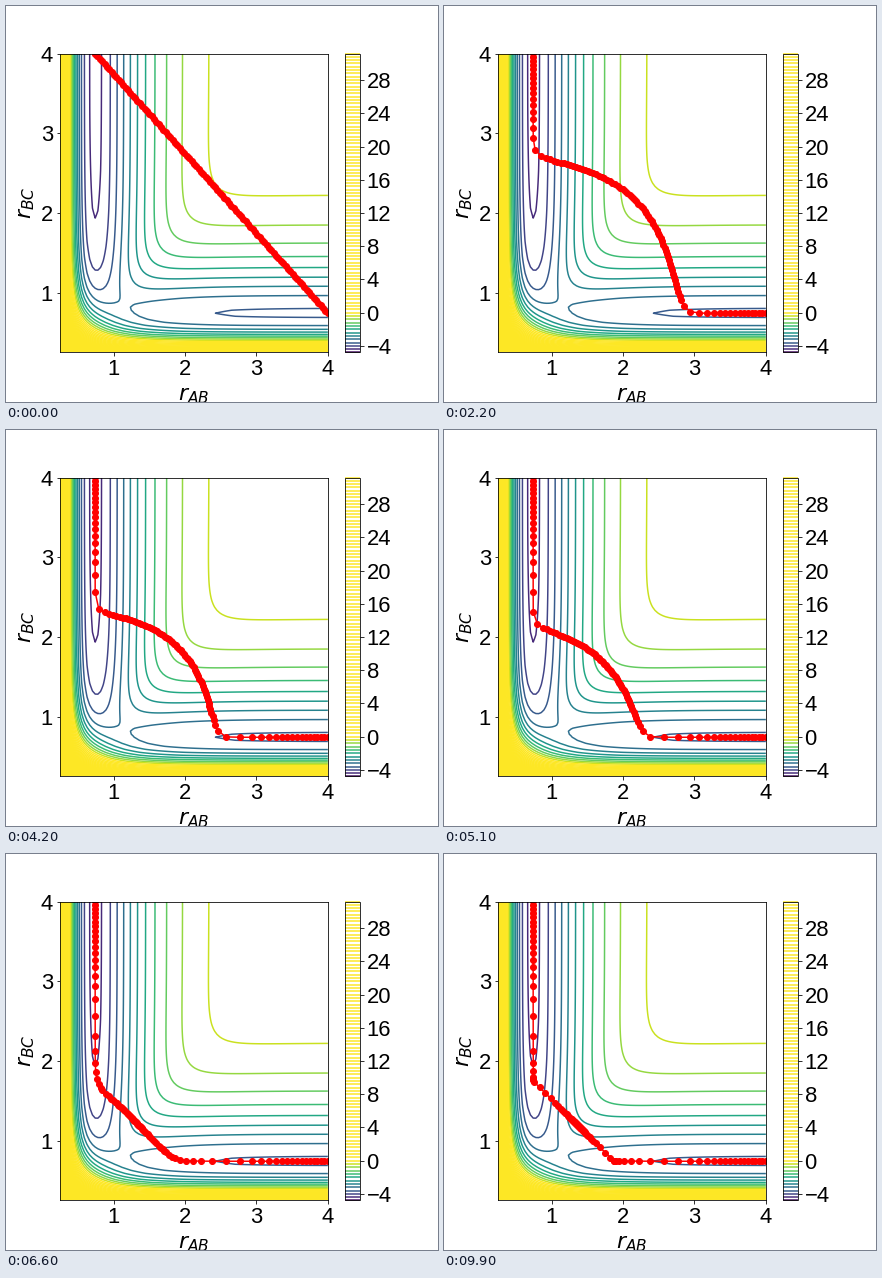
Animation, 432 px wide and 396 px high, one loop 10 s. Source, as a matplotlib script:

```python
import numpy as np
import matplotlib.pyplot as plt
from matplotlib.animation import FuncAnimation

plt.rcParams.update({
    "font.family": "Liberation Sans",
    "font.size": 22,
    "mathtext.fontset": "dejavusans",
})

FRAMES, INTERVAL = 100, 100
DT, SUBSTEPS = 0.02, 5          # flow time per frame, integration steps
BEADS, FINE = 100, 3000
R0, ALPHA = 0.742, 1.942
LO, HI = 0.25, 4.0


def pair(r, d, s):
    """Coulomb and exchange terms of one atom pair."""
    e = np.exp(-ALPHA * (r - R0))
    q = d / 2 * (1.5 * e * e - e) / (1 + s)
    j = d / 4 * (e * e - 6 * e) / (1 + s)
    return q, j


def leps(x, y):
    """LEPS energy of three collinear atoms."""
    qa, ja = pair(x, 4.746, 0.05)
    qb, jb = pair(y, 4.746, 0.30)
    qc, jc = pair(x + y, 3.445, 0.05)
    root = ja**2 + jb**2 + jc**2 - ja * jb - jb * jc - ja * jc
    return qa + qb + qc - np.sqrt(root)


def force(p, h=1e-4):
    x, y = p
    return -np.array([leps(x + h, y) - leps(x - h, y),
                      leps(x, y + h) - leps(x, y - h)]) / (2 * h)


def relax():
    """Let a straight path sink to the valley floor.

    A fine curve follows the full force; the beads on it only move at right
    angles to the curve, so their curve parameter slides back along it.
    """
    u = np.linspace(0, 1, FINE)
    s = np.linspace(0, 1, BEADS)
    curve = np.array([R0 + (HI - R0) * u, HI + (R0 - HI) * u])
    dt = DT / SUBSTEPS

    def beads():
        return np.array([np.interp(s, u, c) for c in curve])

    out = [beads()]
    for _ in range(FRAMES - 1):
        for _ in range(SUBSTEPS):
            f = force(curve)
            mid = curve + f * dt / 2
            fm = force(mid)
            tan = np.gradient(mid, u, axis=1)
            slide = -(fm * tan).sum(0) / (tan**2).sum(0)
            half = s + np.interp(s, u, slide) * dt / 2
            s = s + np.interp(half, u, slide) * dt
            s[0], s[-1] = 0, 1
            s = np.clip(s, 0, 1)
            curve = curve + fm * dt
        out.append(beads())
    return out


paths = relax()

fig = plt.figure(figsize=(6, 5.5), dpi=72)
fig.subplots_adjust(left=0.125, right=0.9, bottom=0.125, top=0.88)
ax = fig.add_subplot()

grid = np.linspace(LO, HI, 100)
X, Y = np.meshgrid(grid, grid)
levels = np.arange(-12, 79) * 0.4
cs = ax.contour(X, Y, leps(X, Y), levels=levels, cmap="viridis",
                vmin=-5, vmax=0, linewidths=1.5)
bar = fig.colorbar(cs, ax=ax, ticks=np.arange(-4, 29, 4))
bar.minorticks_off()

ax.set(xlim=(LO, HI), ylim=(LO, HI), xticks=range(1, 5), yticks=range(1, 5),
       xlabel="$r_{AB}$", ylabel="$r_{BC}$")
line, = ax.plot([], [], "o-", color="red", lw=1.5, ms=6)


def update(i):
    line.set_data(*paths[i])
    return line,


anim = FuncAnimation(fig, update, frames=FRAMES, interval=INTERVAL,
                     repeat=True, repeat_delay=0)
plt.show()
```
